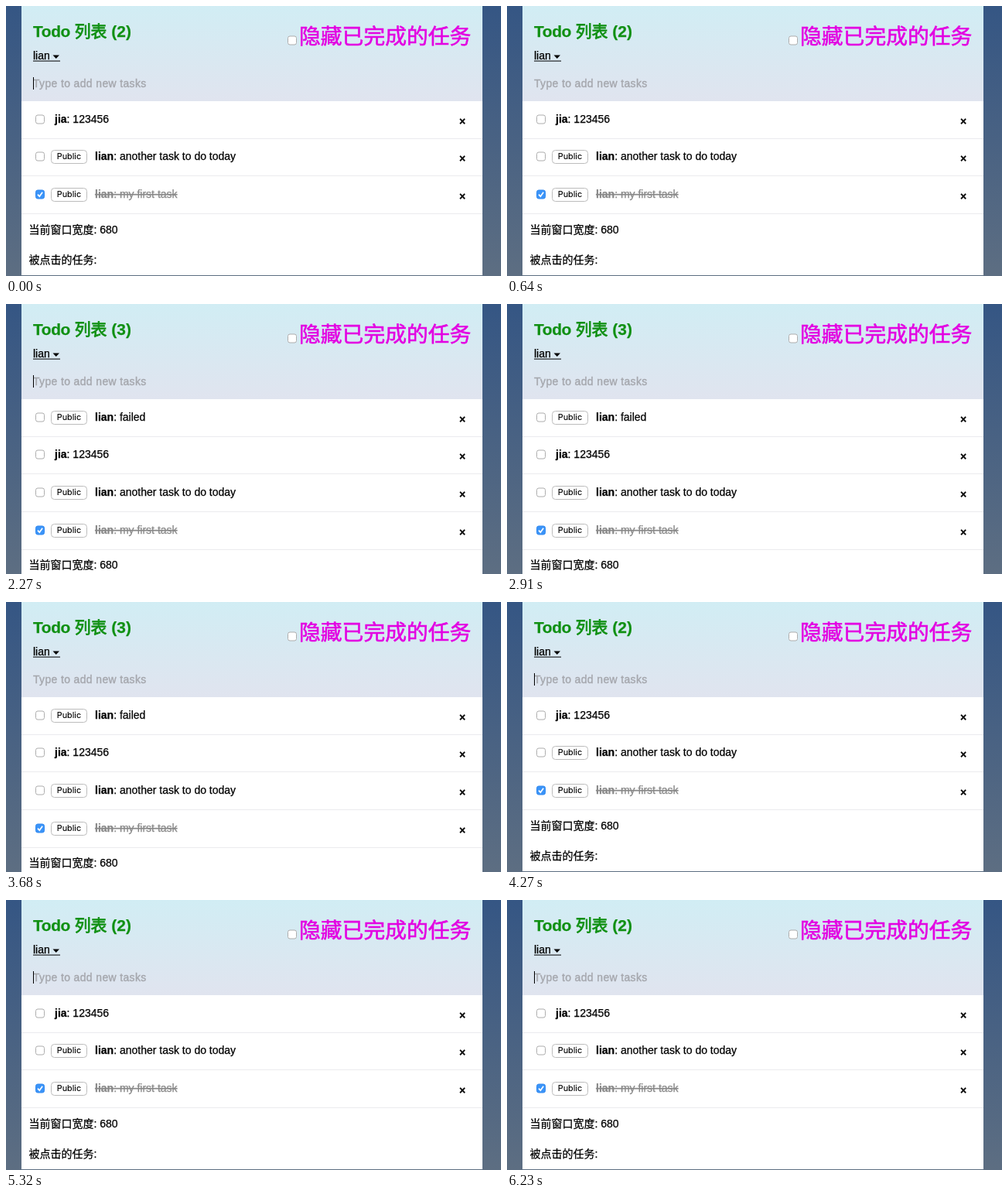
Recreate the animation shown at these times as an HTML page. Size 640 by 349 pixels, loop 6280 ms.

```html
<!DOCTYPE html>
<html lang="zh-CN">
<head>
<meta charset="utf-8">
<title>Todo 列表</title>
<style>
html, body { margin: 0; width: 100%; height: 100%; overflow: hidden; background: #5c6e82; }
svg { display: block; width: 640px; height: 349px; }
/* The thin stroke gives the heavier smoothing of the desktop font. */
text {
  font: 14px "Liberation Sans", "Noto Sans CJK SC", "Noto Sans CJK", sans-serif;
  color: #000; fill: currentColor; stroke: currentColor; stroke-width: .25; white-space: pre;
}
.bold { font-weight: bold; }
.title { font-size: 20.9px; font-weight: bold; color: #109013; }
.title .latin { letter-spacing: -.4px; }
.title .cjk { font-weight: 400; stroke-width: .8; }
.hide { font-size: 27.8px; color: #e300e2; stroke-width: .6; }
.input { font-size: 13.9px; letter-spacing: .4px; }
.hint { color: #a5a7ad; stroke-width: .4; }
.done { color: #888; text-decoration: line-through; }
.label { font: 10.8px Inter, "Liberation Sans", sans-serif; text-anchor: middle; stroke-width: .1; }
.close { font-weight: bold; text-anchor: middle; }
.box { fill: #fff; stroke: #adadad; }
.on { fill: #3b94f8; stroke: #338af0; }
.tick { fill: none; stroke: #fff; stroke-width: 1.7; }
.button { fill: #fff; stroke: #bcbcbc; }
</style>
</head>
<body>
<svg viewBox="0 0 640 349">
  <defs>
    <linearGradient id="sky" x2="0" y2="1">
      <stop stop-color="#355684"/><stop offset="1" stop-color="#5d6e82"/>
    </linearGradient>
    <linearGradient id="head" x2="0" y2="1">
      <stop stop-color="#d1edf4"/><stop offset="1" stop-color="#e0e4ef"/>
    </linearGradient>
  </defs>
  <rect width="640" height="349" fill="url(#sky)"/>
  <rect id="page" x="20" width="596" height="348" fill="#fff"/>
  <rect x="20" width="596" height="123" fill="url(#head)"/>
  <text class="title" x="35" y="40"><tspan class="latin">Todo</tspan> <tspan class="cjk">列表</tspan> (<tspan id="count">2</tspan>)</text>
  <rect class="box" x="364.5" y="39" width="11" height="11" rx="2.5"/>
  <text class="hide" x="379" y="49">隐藏已完成的任务</text>
  <text x="35" y="69">lian</text>
  <path d="M60.5 63.5h8.5l-4.25 4.5z"/>
  <rect x="35" y="70.6" width="35" height="1"/>
  <text class="input hint" id="hint" x="35" y="105">Type to add new tasks</text>
  <text class="input" id="typed" x="35" y="105"></text>
  <rect id="caret" x="35" y="92" width="1" height="16"/>
  <g id="list"></g>
  <text id="size" x="29.5">当前窗口宽度: 680</text>
  <text id="clicked" x="29.5">被点击的任务:</text>
</svg>
<script>
const LOOP = 6280, ROW = 48.65, TOP = 122.6;
const WORD = 'failed';
const KEYS = [1000, 1110, 1230, 1350, 1500, 1640];
const ADDED = 2100, REMOVED = 4060;
const BLINK = 500;

const tasks = [
  { who: 'lian', text: 'failed', own: true },
  { who: 'jia', text: '123456' },
  { who: 'lian', text: 'another task to do today', own: true },
  { who: 'lian', text: 'my first task', own: true, done: true }
];

const $ = id => document.getElementById(id);
const rowY = i => Math.round(TOP + ROW * i);

function rowMarkup({ who, text, own, done }) {
  const button = own
    ? '<rect class="button" x="58.5" y="15.5" width="46" height="17" rx="4"/><text class="label" x="81.5" y="27">Public</text>'
    : '';
  const tick = done ? '<path class="tick" d="M41 23.7l2.3 2.5 3.8-5.4"/>' : '';
  return `<g>
    <rect x="20" y="48" width="596" height="1" fill="#ebebee"/>
    <rect class="box ${done ? 'on' : ''}" x="38.5" y="18" width="11" height="11" rx="2.5"/>${tick}${button}
    <text class="${done ? 'done' : ''}" x="${own ? 115 : 63}" y="28"><tspan class="bold">${who}</tspan>: ${text}</text>
    <text class="close" x="590" y="31">×</text>
  </g>`;
}

$('list').innerHTML = tasks.map(rowMarkup).join('');
const rows = [...$('list').children];

function layout(extra) {
  const shown = extra ? rows : rows.slice(1);
  rows[0].style.display = extra ? '' : 'none';
  shown.forEach((row, i) => row.setAttribute('transform', `translate(0 ${rowY(i)})`));
  const base = Math.round(TOP + ROW * shown.length + 25.2);
  $('size').setAttribute('y', base);
  $('clicked').setAttribute('y', base + 39);
  $('page').setAttribute('height', extra ? 349 : 348);
  $('count').textContent = shown.length - 1;
}

function type(word) {
  $('typed').textContent = word;
  $('hint').style.display = word ? 'none' : '';
  const width = word ? $('typed').getComputedTextLength() : 0;
  $('caret').setAttribute('x', Math.round(35 + width));
}

let lastExtra, lastWord;
function draw(t) {
  const extra = t >= ADDED && t < REMOVED;
  const word = t < ADDED ? WORD.slice(0, KEYS.filter(k => k <= t).length) : '';
  if (extra !== lastExtra) layout(lastExtra = extra);
  if (word !== lastWord) type(lastWord = word);

  // Every key press restarts the blink.
  const since = Math.max(0, ...[...KEYS, ADDED].filter(k => k <= t));
  $('caret').style.display = Math.floor((t - since) / BLINK) % 2 ? 'none' : '';
}

const start = performance.now();
function tick(now) {
  draw(Math.max(0, now - start) % LOOP);
  requestAnimationFrame(tick);
}
draw(0);
requestAnimationFrame(tick);
</script>
</body>
</html>
```
